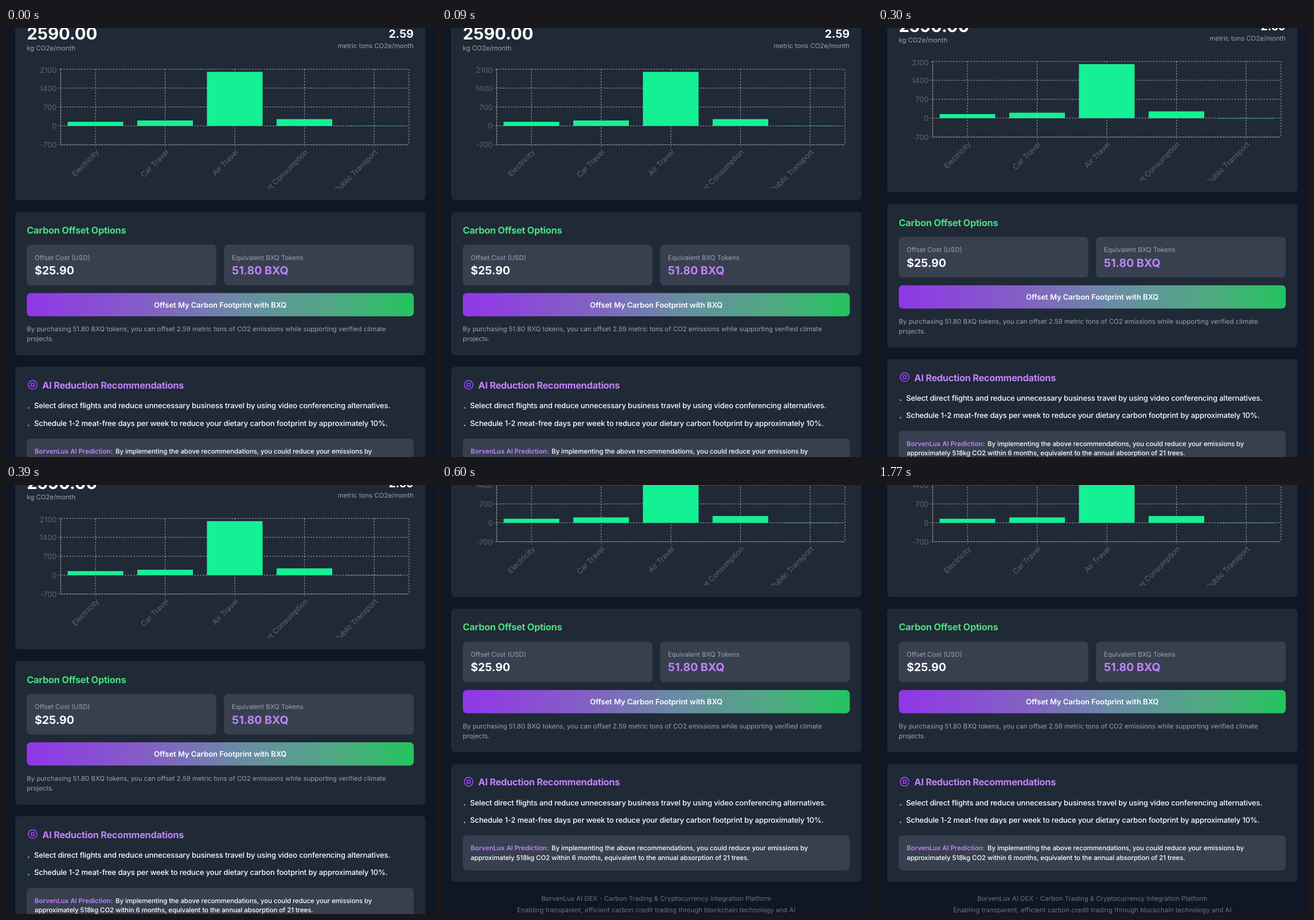
An HTML page with a canvas that plays this animation: 750x747 px, repeating every 2.55 s.

```html
<!DOCTYPE html>
<html lang="en">
<head>
<meta charset="utf-8">
<title>Carbon dashboard</title>
<style>
  html, body { margin: 0; width: 100%; height: 100%; overflow: hidden; background: #0f1726; }
  canvas { display: block; width: 750px; height: 747px; }
</style>
</head>
<body>
<canvas id="stage" width="750" height="747"></canvas>
<script>
const ctx = document.getElementById('stage').getContext('2d');

const LOOP = 2550;
const STEP = 150;
const UNIT = 0.84375;                  // stage pixels per page pixel
const SCROLL = [0, 1, 16, 103, 124];   // page pixels, one wheel step each

const C = {
  page: '#0f1726', card: '#202936', box: '#384050',
  white: '#ffffff', muted: '#9ca3af', faint: '#6b7280',
  green: '#4ade80', purple: '#c084fc', icon: '#9945ff',
  bar: '#14f195', axis: '#666666', grid: '#cccccc'
};

// size in px, weight, letter spacing in px
const FONT = {
  small: [11.41, 400, 0],
  note: [11.41, 500, -0.06],
  strong: [11.41, 600, 0],
  axis: [13.04, 400, -0.085],
  body: [13.04, 500, -0.145],
  button: [13.04, 600, -0.05],
  title: [16.3, 700, -0.25],
  value: [19.56, 700, 0],
  total: [29.3, 700, 0]
};

function text(str, x, y, font, color, align = 'left') {
  const [size, weight, spacing] = FONT[font];
  ctx.font = `${weight} ${size}px Inter, "Liberation Sans", sans-serif`;
  ctx.letterSpacing = spacing + 'px';
  ctx.textAlign = align;
  ctx.fillStyle = color;
  ctx.fillText(str, x, y);
}

function panel(x, y, w, h, fill) {
  ctx.fillStyle = fill;
  ctx.beginPath();
  ctx.roundRect(x, y, w, h, 6.75);
  ctx.fill();
}

function line(x1, y1, x2, y2) {
  ctx.beginPath();
  ctx.moveTo(x1, y1);
  ctx.lineTo(x2, y2);
  ctx.stroke();
}

const plot = { left: 113 * UNIT, right: 833 * UNIT, top: 85 * UNIT, bottom: 241 * UNIT };
const bars = [
  ['Electricity', 150], ['Car Travel', 200], ['Air Travel', 2000],
  ['Meat Consumption', 250], ['Public Transport', -10]
];
const slot = (plot.right - plot.left) / bars.length;
const valueY = v => plot.bottom - (v + 700) / 2800 * (plot.bottom - plot.top);
const slotX = i => plot.left + slot * (i + 0.5);

function drawChart() {
  const { left, right, top, bottom } = plot;
  const levels = [2100, 1400, 700, 0, -700];

  ctx.lineWidth = UNIT;
  ctx.strokeStyle = C.axis;
  line(left, top, left, bottom);
  line(left, bottom, right, bottom);
  for (const v of levels) line(left - 5, valueY(v), left, valueY(v));
  bars.forEach((b, i) => line(slotX(i), bottom, slotX(i), bottom + 5));

  ctx.strokeStyle = C.grid;
  ctx.setLineDash([3 * UNIT, 3 * UNIT]);
  for (const v of levels) line(left, valueY(v), right, valueY(v));
  for (const x of [left, ...bars.map((b, i) => slotX(i)), right]) line(x, top, x, bottom);
  ctx.setLineDash([]);

  for (const v of levels) {
    text(v, 88.4, valueY(v) + (v === 2100 ? 6.3 : 5), 'axis', C.axis, 'right');
  }

  ctx.fillStyle = C.bar;
  bars.forEach(([, v], i) => {
    ctx.fillRect(slotX(i) - slot * 0.4, valueY(v), 115 * UNIT, valueY(0) - valueY(v));
  });

  ctx.save();
  ctx.beginPath();
  ctx.rect(36, 50, 675, 229.3);
  ctx.clip();
  bars.forEach(([name], i) => {
    ctx.save();
    ctx.translate(slotX(i) + 6.8, 217);
    ctx.rotate(-Math.PI / 4);
    text(name, 0, 0, 'axis', C.axis, 'right');
    ctx.restore();
  });
  ctx.restore();
}

function drawSummary() {
  panel(16, -200, 715.5, 499.5, C.card);
  text('2590.00', 36.3, 20.3, 'total', C.white);
  text('kg CO2e/month', 36.3, 38.8, 'small', C.muted);
  text('2.59', 711, 17, 'value', C.white, 'right');
  text('metric tons CO2e/month', 711, 35.4, 'small', C.muted, 'right');
  drawChart();
}

function drawOffset() {
  panel(16, 319.9, 715.5, 250, C.card);
  text('Carbon Offset Options', 36.3, 358, 'title', C.green);

  panel(36.3, 377.3, 330.6, 70.8, C.box);
  text('Offset Cost (USD)', 50, 403.5, 'small', C.muted);
  text('$25.90', 50, 429, 'value', C.white);

  panel(380.4, 377.3, 330.8, 70.8, C.box);
  text('Equivalent BXQ Tokens', 394, 403.5, 'small', C.muted);
  text('51.80 BXQ', 394, 429, 'value', C.purple);

  const fade = ctx.createLinearGradient(36.3, 0, 711.2, 0);
  [[0, '#9136e8'], [0.33, '#8262c2'], [0.55, '#6a8ba6'], [0.8, '#4fa982'], [1, '#23c45f']]
    .forEach(([at, color]) => fade.addColorStop(at, color));
  panel(36.3, 461.6, 674.9, 40.5, fade);
  text('Offset My Carbon Footprint with BXQ', 373.75, 486.8, 'button', C.white, 'center');

  text('By purchasing 51.80 BXQ tokens, you can offset 2.59 metric tons of CO2 emissions while supporting verified climate',
    36.3, 528.3, 'small', C.muted);
  text('projects.', 36.3, 545.2, 'small', C.muted);
}

function drawIcon(x, y) {
  ctx.strokeStyle = C.icon;
  ctx.lineWidth = 2 * UNIT;
  ctx.beginPath();
  ctx.arc(x, y, 9 * UNIT, 0, Math.PI * 2);
  ctx.stroke();
  ctx.strokeRect(x - 3 * UNIT, y - 3 * UNIT, 6 * UNIT, 6 * UNIT);
}

function drawAdvice() {
  panel(16, 589.9, 715.5, 206, C.card);
  drawIcon(46.4, 621.4);
  text('AI Reduction Recommendations', 63.3, 628, 'title', C.purple);

  [
    'Select direct flights and reduce unnecessary business travel by using video conferencing alternatives.',
    'Schedule 1-2 meat-free days per week to reduce your dietary carbon footprint by approximately 10%.'
  ].forEach((tip, i) => {
    const y = 662.3 + i * 30.4;
    ctx.fillStyle = C.green;
    ctx.beginPath();
    ctx.arc(39.4, y - 0.7, 1.35, 0, Math.PI * 2);
    ctx.fill();
    text(tip, 49, y, 'body', C.white);
  });

  panel(36.3, 714.9, 674.9, 60.8, C.box);
  text('BorvenLux AI Prediction:', 50, 741, 'strong', C.purple);
  text('By implementing the above recommendations, you could reduce your emissions by',
    191, 741, 'note', C.white);
  text('approximately 518kg CO2 within 6 months, equivalent to the annual absorption of 21 trees.',
    50, 757.9, 'note', C.white);
}

function drawFooter() {
  text('BorvenLux AI DEX - Carbon Trading & Cryptocurrency Integration Platform',
    373.75, 828.6, 'small', C.faint, 'center');
  text('Enabling transparent, efficient carbon credit trading through blockchain technology and AI',
    373.75, 849, 'small', C.faint, 'center');
}

function draw(ms) {
  const step = Math.min(Math.floor(ms / STEP), SCROLL.length - 1);
  ctx.fillStyle = C.page;
  ctx.fillRect(0, 0, 750, 747);
  ctx.save();
  ctx.translate(0, -SCROLL[step] * UNIT);
  drawSummary();
  drawOffset();
  drawAdvice();
  drawFooter();
  ctx.restore();
}

ctx.textRendering = 'geometricPrecision';
const start = performance.now();

function tick() {
  draw((performance.now() - start) % LOOP);
  requestAnimationFrame(tick);
}
tick();
</script>
</body>
</html>
```
